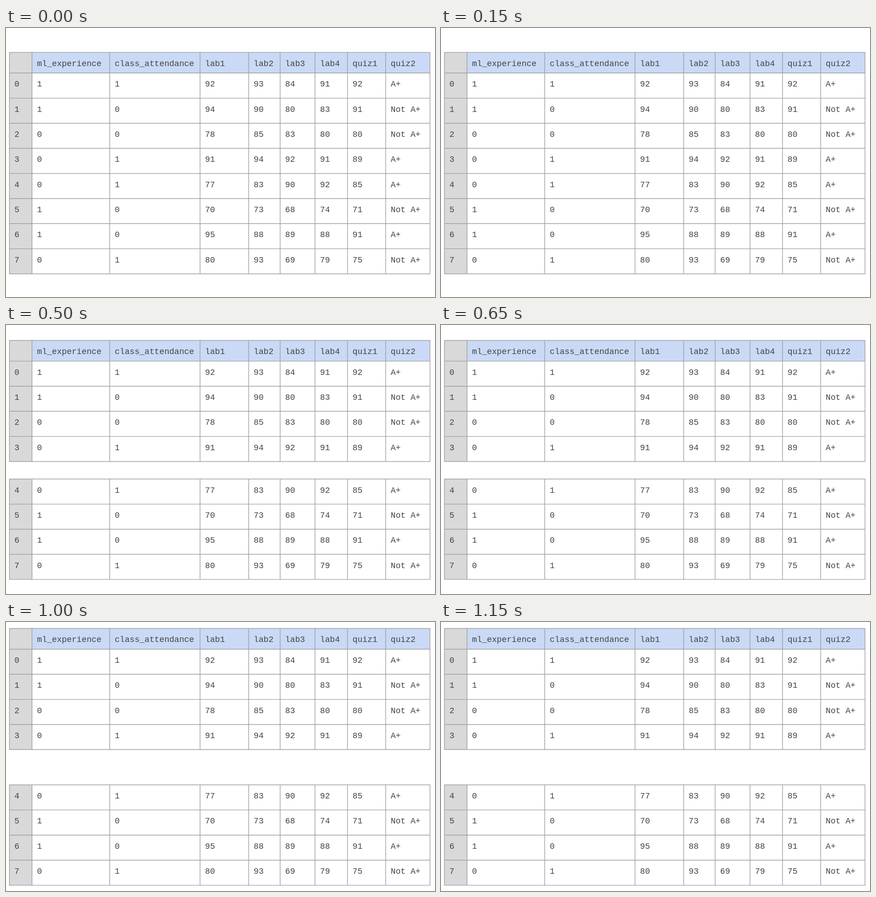
An HTML page for the animation above (1250 ms loop, 944 by 593 pixels).

```html
<!DOCTYPE html>
<html>
<head>
<meta charset="utf-8">
<title>Splitting a table</title>
<style>
  html, body { margin: 0; width: 100%; height: 100%; overflow: hidden; background: #fff; }
  svg { display: block; }
  text { font: 18.2px "Liberation Mono", "Courier New", monospace; fill: #444; white-space: pre; }
  path { fill: none; stroke: #9e9e9e; stroke-width: 1.4; stroke-linecap: square; }
</style>
</head>
<body>
<svg width="944" height="593" viewBox="0 0 944 593">
  <g id="upper"></g>
  <g id="lower"></g>
</svg>
<script>
const columns = [7.5, 57.3, 228.3, 427, 534, 603.3, 680, 751.5, 835.5, 933];
const left = columns[0], right = columns[9];
const top0 = 53.6, headHeight = 45.7, rowHeight = 55.33;
const rows = [
  " ,ml_experience,class_attendance,lab1,lab2,lab3,lab4,quiz1,quiz2",
  "0,1,1,92,93,84,91,92,A+",
  "1,1,0,94,90,80,83,91,Not A+",
  "2,0,0,78,85,83,80,80,Not A+",
  "3,0,1,91,94,92,91,89,A+",
  "4,0,1,77,83,90,92,85,A+",
  "5,1,0,70,73,68,74,71,Not A+",
  "6,1,0,95,88,89,88,91,A+",
  "7,0,1,80,93,69,79,75,Not A+"
].map(row => row.split(","));

// Top edge of a row; row 0 is the header
const edge = i => i ? top0 + headHeight + (i - 1) * rowHeight : top0;

const rect = (x, y, w, h, fill) =>
  `<rect x="${x}" y="${y}" width="${w}" height="${h}" fill="${fill}"/>`;

function drawRows(group, from, to) {
  const y0 = edge(from), y1 = edge(to);
  let out = rect(left, y0, columns[1] - left, y1 - y0, "#d9d9d9");
  if (!from) out += rect(columns[1], y0, right - columns[1], headHeight, "#cad9f6");

  let grid = columns.map(x => `M${x} ${y0}V${y1}`).join("");
  for (let i = from; i <= to; i++) grid += `M${left} ${edge(i)}H${right}`;
  out += `<path d="${grid}"/>`;

  for (let i = from; i < to; i++)
    rows[i].forEach((value, c) => {
      out += `<text x="${columns[c] + 11}" y="${edge(i) + 30}">${value}</text>`;
    });
  group.innerHTML = out;
}

const upper = document.getElementById("upper");
const lower = document.getElementById("lower");
drawRows(upper, 0, 5);
drawRows(lower, 5, 9);

// The halves part in five held steps
function tick() {
  const step = Math.floor(performance.now() % 1250 / 250);
  const down = step ? 9.75 * step - 0.6 : 0;
  upper.setAttribute("transform", `translate(0 ${-9.83 * step})`);
  lower.setAttribute("transform", `translate(0 ${down})`);
  requestAnimationFrame(tick);
}
tick();
</script>
</body>
</html>
```
